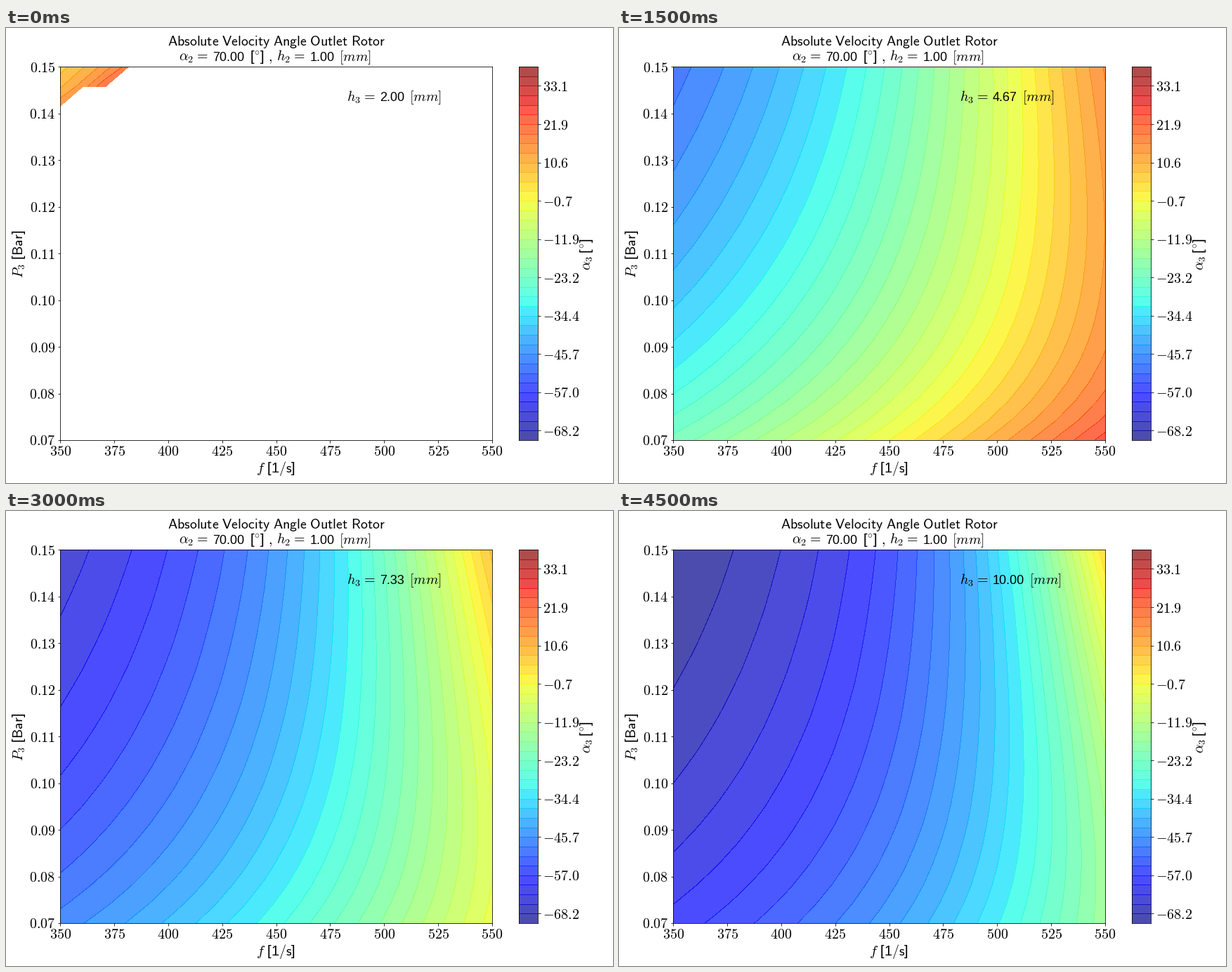
Write a matplotlib script that moves like this. It is 864 px wide and 648 px high and loops after 5000 ms.

```python
import numpy as np
import matplotlib.pyplot as plt
from matplotlib.animation import FuncAnimation

W, H, DPI = 864, 648, 72
FRAMES, INTERVAL = 10, 500
ALPHA, SIZE = 0.7, 20

plt.rcParams["mathtext.fontset"] = "cm"
plt.rcParams["font.family"] = "Liberation Sans"
plt.rcParams["axes.linewidth"] = 0.8

LEVELS = -71.035 + 2.815 * np.arange(40)
CMAP = plt.get_cmap("jet")
HEIGHTS = np.linspace(2, 10, FRAMES)
freq, pres = np.meshgrid(np.linspace(350, 550, 20), np.linspace(0.07, 0.15, 20))


def outlet_angle(h):
    """Velocity triangle at the rotor outlet; masked where the flow is choked."""
    drop = np.log(pres / 0.15) / np.log(0.07 / 0.15)
    dens = (pres / 0.15) ** 0.95
    u = 0.6512e-3 * freq
    w2 = 0.6176 + 0.083 * drop - 1.713 * u + u ** 2
    swirl2 = w2 * (dens * h) ** 2 - 1
    tan = u * dens * h - np.sqrt(np.maximum(swirl2, 0))
    angle = np.degrees(np.arctan(tan))
    angle = np.clip(angle, LEVELS[0] + 0.001, LEVELS[-1] - 0.001)
    return np.ma.masked_where(swirl2 < 0, angle)


def sans(text):
    return r"\mathsf{" + text.replace(" ", r"\ ") + "}"


def upright(text):
    return r"\mathregular{" + text + "}"


EQ = r"\hspace{0.08}=\hspace{0.08}"
DEG = upright("[") + r"{}^{\circ}" + upright("]")
MM = "[mm]"

fig = plt.figure(figsize=(W / DPI, H / DPI), dpi=DPI, facecolor="white")


def add_axes(left, top, right, bottom):
    return fig.add_axes([left / W, 1 - bottom / H, (right - left) / W, (bottom - top) / H])


def put(x, y, text, ha="left", size=SIZE, rotation=0):
    return fig.text(x / W, 1 - y / H, text, fontsize=size, ha=ha,
                    va="baseline", rotation=rotation, rotation_mode="anchor")


def formula(x, y, text, **kw):
    return put(x, y, "$" + text + "$", **kw)


def number(x, y, text):
    return put(x, y, text, size=18)


ax = add_axes(77.2, 55.2, 692, 587)
ax.set_xlim(350, 550)
ax.set_ylim(0.07, 0.15)
xticks = np.arange(350, 551, 25)
yticks = np.linspace(0.07, 0.15, 9)
ax.set_xticks(xticks, [f"${v}$" for v in xticks])
ax.set_yticks(yticks, [f"${v:.2f}$" for v in yticks])
ax.tick_params(labelsize=SIZE)

# Colour bar
cax = add_axes(730.4, 55.2, 757, 587)
cax.set_xlim(0, 1)
cax.set_ylim(LEVELS[0], LEVELS[-1])
bands = CMAP((np.arange(39) + 0.5) / 39)
for lo, hi, color in zip(LEVELS, LEVELS[1:], bands):
    cax.axhspan(lo, hi, facecolor=color, alpha=ALPHA, linewidth=0)
cax.hlines(LEVELS[1:-1], 0, 1, colors=bands[1:], alpha=ALPHA, linewidth=1)
cax.set_xticks([])
cax.yaxis.tick_right()
cax.set_yticks(LEVELS[1::4], [f"${v:.1f}$" for v in LEVELS[1::4]])
cax.tick_params(labelsize=SIZE)

# Title
formula(385, 25, sans("Absolute Velocity Angle Outlet Rotor"), ha="center", size=19.87)
formula(246.5, 46.7, r"\alpha_2" + EQ)
number(294.3, 46.7, "70.00")
formula(346.8, 46.7, DEG + r"\ ,")
formula(385.2, 46.7, "h_2" + EQ)
number(432.3, 46.7, "1.00")
formula(474.5, 46.7, MM)

# Axis labels
formula(384, 633, r"f\ " + upright("[1") + sans("/s") + upright("]"), ha="center")
formula(24.2, 322, r"P_3\ " + upright("[") + sans("Bar") + upright("]"),
        ha="center", rotation=90)
formula(832.5, 322.5, r"\alpha_3\:" + DEG, ha="center", rotation=90)

# Blade height readout
formula(484.9, 104.5, "h_3" + EQ)
value = number(532, 104.5, "")
unit = formula(574.2, 104.5, MM)

fills = []


def update(i):
    while fills:
        fills.pop().remove()
    h = HEIGHTS[i]
    fills.append(ax.contourf(freq, pres, outlet_angle(h), levels=LEVELS,
                             cmap=CMAP, alpha=ALPHA))
    text = f"{h:.2f}"
    value.set_text(text)
    unit.set_x((534.2 + 10 * len(text)) / W)
    return []


anim = FuncAnimation(fig, update, frames=FRAMES, interval=INTERVAL,
                     repeat=True, repeat_delay=0, blit=False)
plt.show()
```
